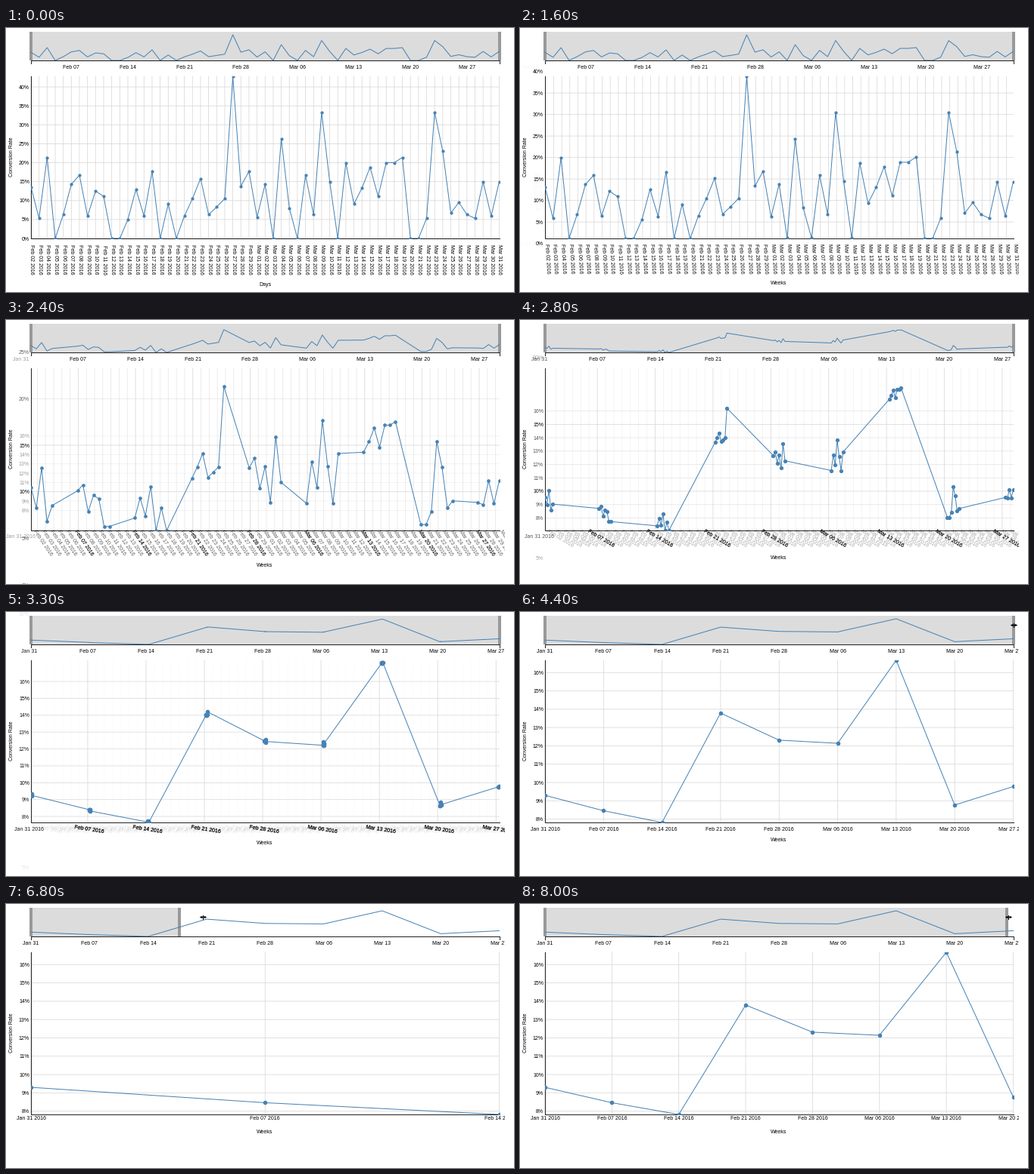
Write a matplotlib script that moves like this. It is 671x350 px and loops after 8.1 s.

```python
import numpy as np
import matplotlib.pyplot as plt
from matplotlib.animation import FuncAnimation
from matplotlib.patches import Rectangle

W, H, DPI = 671, 350, 100
PX = 72 / DPI
LEFT, RIGHT, TOP, BOTTOM = 33, 651.5, 64, 279
NAV_TOP, NAV_BOTTOM = 5, 43
BLUE, GRID, AXIS = "#4682b4", "#d9d9d9", "#222222"
STEP_MS, FRAMES = 100, 81

DAILY = np.array([
    13.6, 5.3, 21.4, 0, 6.3, 14.3, 16.7, 5.9, 12.5, 11.1, 0, 0, 5, 13, 5.9,
    17.7, 0, 9.1, 0, 5.9, 10.5, 15.8, 6.3, 8.3, 10.5, 42.8, 13.8, 17.7, 5.6,
    14.3, 0, 26.3, 8, 0, 16.7, 6.3, 33.3, 15, 0, 20, 9.1, 13.3, 18.8, 11.1,
    20, 20, 21.4, 0, 0, 5.3, 33.3, 23, 6.7, 9.5, 6.3, 5.3, 15, 5.9, 15])
WEEKLY = np.array([9.30, 8.46, 7.82, 13.79, 12.31, 12.14, 16.67, 8.77, 9.78])
DAYS = np.arange(len(DAILY))
WEEK_OF_DAY = (DAYS + 2) // 7
WEEK_STARTS = range(-2, 55, 7)

# brush handle: time in ms, x in px
DRAG_T = [4500, 5500, 6300, 6750, 7200, 8000, 8100]
DRAG_X = [651.5, 525, 430, 190, 540, 643, 648]

plt.rcParams["font.family"] = "Liberation Sans"
fig = plt.figure(figsize=(W / DPI, H / DPI), dpi=DPI, facecolor="white")
ax = fig.add_axes([0, 0, 1, 1])


def lerp(a, b, p):
    return a + (b - a) * p


def progress(t, start, length):
    return min(max((t - start) / length, 0), 1)


def ease_in_out(u, power):
    if u < 0.5:
        return (2 * u) ** power / 2
    return 1 - (2 - 2 * u) ** power / 2


def day_x(day):
    return LEFT + (RIGHT - LEFT) * day / (len(DAILY) - 1)


def week_x(week, shown=9):
    return LEFT + (RIGHT - LEFT) * week / (shown - 1)


def scale_y(value, low, high):
    return BOTTOM - (BOTTOM - TOP) * (value - low) / (high - low)


def daily_y(value):
    return scale_y(value, 0, DAILY.max())


def weekly_y(value):
    return scale_y(value, WEEKLY.min(), WEEKLY.max())


def nav_y(y):
    return NAV_BOTTOM - (BOTTOM - y) * 34 / (BOTTOM - TOP)


def date(day, year=False):
    if day < -1:
        month, number = "Jan", day + 33
    elif day < 28:
        month, number = "Feb", day + 2
    else:
        month, number = "Mar", day - 27
    return f"{month} {number:02d}" + (" 2016" if year else "")


def label(x, y, text, turn=0, alpha=1, ha="center", local=(0, 0)):
    """Text whose capital letters are centred at a local offset, turned clockwise."""
    a = np.radians(turn)
    u, v = local[0], local[1] + 2.5
    ax.text(x + u * np.cos(a) - v * np.sin(a), y + u * np.sin(a) + v * np.cos(a),
            text, fontsize=7 * PX, rotation=-turn, rotation_mode="anchor",
            ha=ha, va="baseline", alpha=alpha, color="black", zorder=5)


def stroke(xs, ys, color=AXIS, width=1.0, alpha=1, **style):
    return ax.plot(xs, ys, color=color, lw=width * PX, alpha=alpha, **style)[0]


def box(x, y, w, h, color, zorder=1):
    ax.add_patch(Rectangle((x, y), w, h, fc=color, ec="none", zorder=zorder))


def grid_v(x, alpha=1):
    if LEFT <= x <= RIGHT + 0.5:
        stroke([x, x], [TOP, BOTTOM], GRID, 0.8, alpha, zorder=1, snap=False)


def grid_h(y, alpha=1):
    if TOP <= y <= BOTTOM:
        stroke([LEFT, RIGHT], [y, y], GRID, 0.8, alpha, zorder=1, snap=False)


def draw_navigator(xs, ys, p, handle, cursor):
    box(LEFT, NAV_TOP, handle - LEFT, NAV_BOTTOM - NAV_TOP, "#dcdcdc")
    for x in (LEFT, handle):
        box(x - 2, NAV_TOP, 4, NAV_BOTTOM - NAV_TOP, "#999999", 2)
    stroke(xs, nav_y(ys), BLUE, 1, zorder=3)
    stroke([LEFT, LEFT, RIGHT, RIGHT],
           [NAV_BOTTOM + 4, NAV_BOTTOM, NAV_BOTTOM, NAV_BOTTOM + 4], zorder=4)
    for week, day in enumerate(WEEK_STARTS):
        x = lerp(day_x(day), week_x(week), p)
        label(x, 51.5, date(day), alpha=p if day < 0 else 1)
    if cursor is not None:
        stroke([cursor - 3, cursor + 3], [17, 17], "black", 1.2, zorder=8)
        stroke([cursor, cursor], [14.5, 19.5], "black", 1, zorder=8)
        for side, marker in ((-3, "<"), (3, ">")):
            ax.plot(cursor + side, 17, marker, color="black", ms=3.4 * PX,
                    mew=0, zorder=8)


def draw_y_axis(p):
    old, new = range(0, 41, 5), range(8, 17)
    for value in sorted({*old, *new}):
        alpha = 1 if value in old and value in new else (
            1 - p if value in old else p)
        if alpha <= 0:
            continue
        y = lerp(daily_y(value), weekly_y(value), p)
        grid_h(y, alpha)
        label(31, y, f"{value}%", alpha=alpha, ha="right")


def draw_x_axis(p, shown):
    turn = 90 * (1 - p)
    rise = 9 if shown == 9 else 5
    local = (lerp(28, 0, p), lerp(-1.5, rise, p))
    if p < 1:
        for day in DAYS:
            if day in WEEK_STARTS:
                continue
            x = lerp(day_x(day), week_x((day + 2) / 7), p)
            grid_v(x, 1 - p)
            label(x, BOTTOM, date(day, True), turn, 1 - p, local=local)
    for week, day in enumerate(WEEK_STARTS[:shown]):
        x = lerp(day_x(day), week_x(week, shown), p)
        if day < 0:
            grid_v(x, p)
            if p > 0:
                label(x, BOTTOM, date(day, True), alpha=p,
                      local=(0, lerp(6, rise, p)))
            continue
        grid_v(x)
        label(x, BOTTOM, date(day, True), turn, local=local)
        if 0 < p < 1:
            label(x, BOTTOM, date(day, True), turn, p, local=local)


def draw_series(xs, ys, radius):
    clip = Rectangle((LEFT, TOP), RIGHT - LEFT + 0.5, BOTTOM - TOP,
                     transform=ax.transData)
    line = stroke(xs, ys, BLUE, 1, zorder=3)
    dots = ax.plot(xs, ys, "o", color=BLUE, ms=2 * radius * PX, mew=0, zorder=4)[0]
    for artist in (line, dots):
        artist.set_clip_path(clip)


def draw(frame):
    t = frame * STEP_MS
    ax.clear()
    ax.set(xlim=(0, W), ylim=(H, 0))
    ax.axis("off")

    p = ease_in_out(progress(t, 1250, 2640), 2)
    q = ease_in_out(progress(t, 1340, 2405), 3)
    handle = np.interp(t, DRAG_T, DRAG_X)
    cursor = np.interp(t + 40, DRAG_T, DRAG_X) if t >= 4200 else None
    shown = int((handle - LEFT) / (RIGHT - LEFT) * 8 + 1e-6) + 1

    if q < 1:
        xs = lerp(day_x(DAYS), week_x(WEEK_OF_DAY), q)
        ys = lerp(daily_y(DAILY), weekly_y(WEEKLY)[WEEK_OF_DAY], q)
        main_x, main_y = xs, ys
    else:
        weeks = np.arange(9)
        xs, ys = week_x(weeks), weekly_y(WEEKLY)
        main_x, main_y = week_x(weeks[:shown], shown), ys[:shown]

    draw_navigator(xs, ys, p, handle, cursor)
    draw_y_axis(p)
    draw_x_axis(p, shown)
    draw_series(main_x, main_y, lerp(2.1, 2.8, q))
    stroke([LEFT, LEFT, RIGHT], [TOP, BOTTOM, BOTTOM], zorder=2)
    label(7, 171, "Conversion Rate", -90)
    label(342, lerp(339, 302, p), "Weeks" if p > 0 else "Days")
    box(659, 0, W - 659, H, "white", 9)
    return []


anim = FuncAnimation(fig, draw, frames=FRAMES, interval=STEP_MS,
                     init_func=lambda: [], repeat=True, repeat_delay=0)
plt.show()
```
